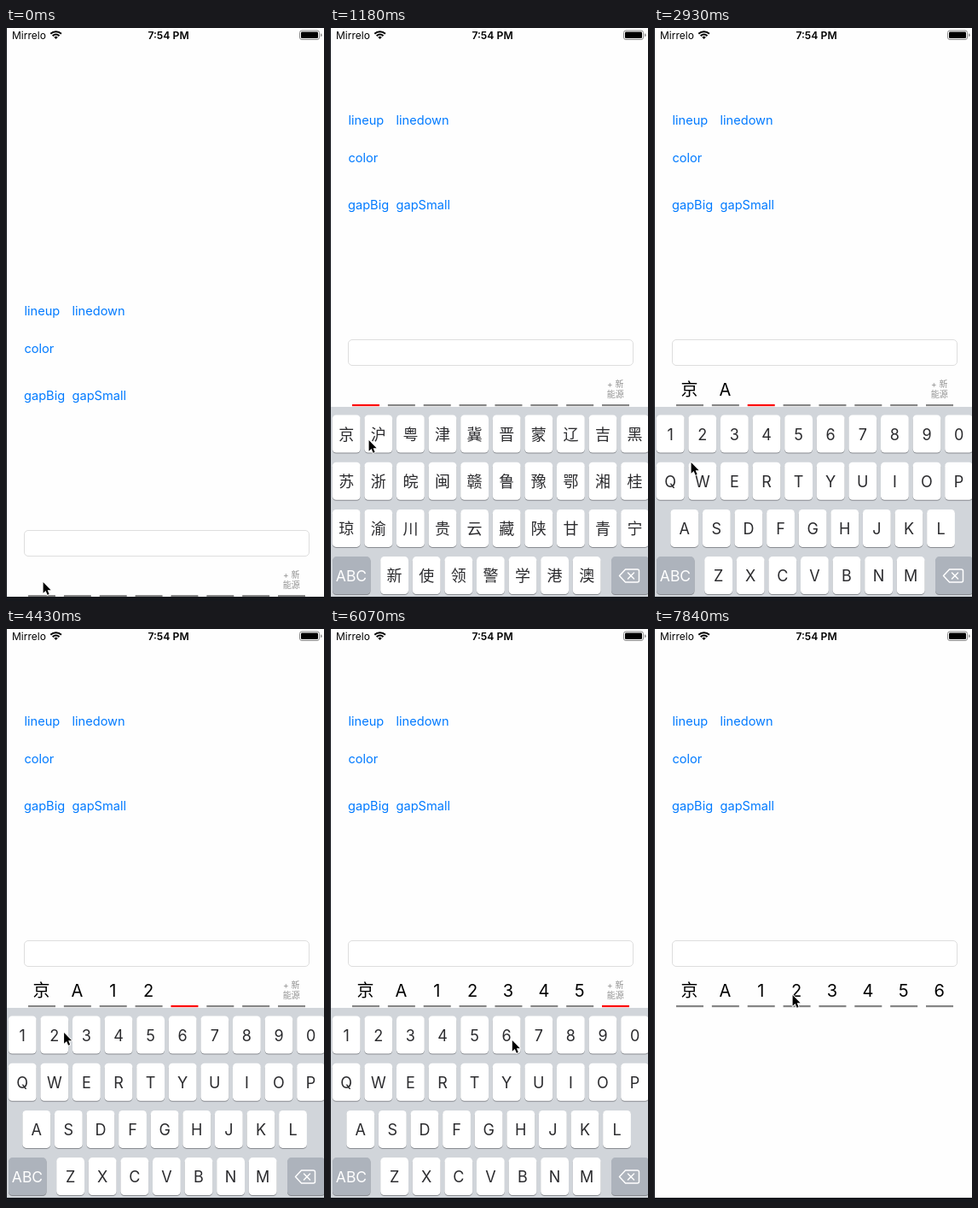
Write an HTML page that moves like this. It is 373 px wide and 670 px high and loops after 7.99 s.

```html
<!DOCTYPE html>
<html lang="zh-CN">
<head>
<meta charset="utf-8">
<title>Plate keyboard</title>
<style>
  html, body { margin: 0; width: 100%; height: 100%; overflow: hidden; background: #fefefe; }
  svg { display: block; width: 373px; height: 670px; }
  text { font-family: Inter, "Noto Sans CJK SC", "Noto Sans CJK", sans-serif; }
  .link { font-size: 14.6px; fill: #007aff; }
  .key { font-size: 18px; fill: #2b2b2e; text-anchor: middle; }
  .char { font-size: 20px; text-anchor: middle; }
  .hint { font-size: 10px; fill: #939393; text-anchor: middle; }
  .abc { font-size: 17.5px; fill: #fff; text-anchor: middle; }
</style>
</head>
<body>
<svg viewBox="0 0 373 670">
  <rect width="373" height="670" fill="#fefefe"/>
  <g id="page">
    <text class="link" x="21.5" y="113">lineup</text>
    <text class="link" x="77.5" y="113">linedown</text>
    <text class="link" x="21.5" y="157">color</text>
    <text class="link" x="21" y="212">gapBig</text>
    <text class="link" x="77.5" y="212">gapSmall</text>
    <rect x="21.5" y="364.5" width="334" height="30" rx="4.5" fill="#fff" stroke="#dedede"/>
    <g id="cells"></g>
    <g id="hint">
      <text class="hint" x="334.7" y="420.2">+ 新</text>
      <text class="hint" x="334.7" y="431.8">能源</text>
    </g>
  </g>
  <g id="board">
    <rect y="443" width="373" height="223" fill="#d1d5da"/>
    <g id="hanzi"></g>
    <g id="latin"></g>
    <g id="side"></g>
    <text class="abc" x="25" y="646.5">ABC</text>
    <g fill="none" stroke="#fff" stroke-width="1.5" stroke-linejoin="round" stroke-linecap="round">
      <path d="M339.5 640.5L346.5 633H360.5Q362.5 633 362.5 635V646Q362.5 648 360.5 648H346.5Z"/>
      <path d="M349.5 637L356.5 644M356.5 637L349.5 644"/>
    </g>
  </g>
  <rect y="665" width="373" height="5" fill="#16181d"/>
  <rect width="1" height="670" fill="#16181d"/>
  <text x="7" y="12.7" font-size="12">Mirrelo</text>
  <text x="190.5" y="12.7" font-size="12.2" font-weight="600" text-anchor="middle">7:54 PM</text>
  <g fill="none" stroke="#000" stroke-width="2">
    <path d="M52.3 6.8A8.9 8.9 0 0 1 64.9 6.8M54.7 9.2A5.5 5.5 0 0 1 62.5 9.2"/>
    <path d="M58.6 13L56.4 10.8A3.1 3.1 0 0 1 60.8 10.8Z" fill="#000" stroke="none"/>
  </g>
  <rect x="344.5" y="3" width="23" height="10.5" rx="2.5" fill="none" stroke="#8a8a8a"/>
  <rect x="346" y="4.5" width="20" height="7.5" rx="1.2"/>
  <path d="M369 6.3Q370.6 6.8 370.6 8.2T369 10.2Z" fill="#8a8a8a"/>
  <path id="cursor" d="M.6 1V13.8L3.6 11.1L5.6 15.8L7.6 14.9L5.7 10.3H9.6Z" stroke="#fff" stroke-width="1.8" paint-order="stroke" stroke-linejoin="round"/>
</svg>
<script>
const LOOP = 7990, TICK = 148, LAST = 53, SHIFT = 223;
const LEFT = 2.8, PITCH = 37.6, ROW = 55.2, KEY_W = 32.8;
const PLATE = [..."京A123456"];
const typedAt = [12, 18, 25, 30, 33, 36, 38, 42]; // tick at which each cell fills
const $ = id => document.getElementById(id);

function add(parent, tag, attrs, text = "") {
  const el = document.createElementNS("http://www.w3.org/2000/svg", tag);
  for (const k in attrs) el.setAttribute(k, attrs[k]);
  el.textContent = text;
  return parent.appendChild(el);
}

function keyCap(parent, x, row, width, fill) {
  const box = { x, y: 452.5 + row * ROW, width, height: 44, rx: 4.5 };
  add(parent, "rect", { ...box, y: box.y + 1, fill: "#898c91" });
  return add(parent, "rect", { ...box, fill });
}

const keys = {};
function layout(parent, rows, indent) {
  rows.forEach((row, r) => [...row].forEach((ch, i) => {
    const x = LEFT + (indent[r] + i) * PITCH, mid = x + KEY_W / 2;
    const cap = keyCap(parent, x, r, KEY_W, "#fff");
    add(parent, "text", { class: "key", x: mid, y: 481.5 + r * ROW }, ch);
    keys[ch] = { cap, x: mid, y: 475 + r * ROW };
  }));
}

layout($("hanzi"), ["京沪粤津冀晋蒙辽吉黑", "苏浙皖闽赣鲁豫鄂湘桂", "琼渝川贵云藏陕甘青宁", "新使领警学港澳"], [0, 0, 0, 1.5]);
layout($("latin"), ["1234567890", "QWERTYUIOP", "ASDFGHJKL", "ZXCVBNM"], [0, 0, 0.44, 1.5]);
for (const x of [3, 330]) keyCap($("side"), x, 3, 44.5, "#adb3bc");

const cells = PLATE.map((ch, i) => {
  const x = 26 + i * 41.86;
  return {
    char: add($("cells"), "text", { class: "char", x: x + 15.6, y: 430 }, ch),
    line: add($("cells"), "rect", { x, y: 440, width: 32, height: 2.2 })
  };
});

// The pointer reaches each key one tick before it types; the rest are free stops
const stops = PLATE.map((ch, i) => [typedAt[i] - 1, keys[ch].x + 6, keys[ch].y + 5]).concat([
  [0, 43, 647], [8, 45, 481], [20, 43, 507], [30, 67.5, 471],
  [43, 239, 481], [47, 245, 482], [49, 313, 450], [LAST, 162, 427]
]).sort((a, b) => a[0] - b[0]);

function pointer(n) {
  const i = Math.max(1, stops.findIndex(s => s[0] >= n));
  const [a, ax, ay] = stops[i - 1], [b, bx, by] = stops[i];
  const k = 1 - (1 - (n - a) / (b - a)) ** 2;
  return [ax + (bx - ax) * k, ay + (by - ay) * k];
}

// Critically damped spring, k in ticks
const spring = k => k <= 0 ? 0 : 1 - (1 + 2.76 * k) * Math.exp(-2.76 * k);
const move = (id, x, y) => $(id).setAttribute("transform", `translate(${x} ${y})`);
const show = (el, on) => el.setAttribute("visibility", on ? "visible" : "hidden");

function draw(n) {
  const count = typedAt.filter(t => n >= t).length;
  const up = spring(n - 1), down = spring(n - typedAt[7]);
  move("page", 0, SHIFT * (1 - up));
  move("board", 0, SHIFT * (1 - up + down));
  move("cursor", ...pointer(n));
  cells.forEach((c, i) => {
    show(c.char, i < count);
    c.line.setAttribute("fill", n > 0 && i === count ? "#fb0606" : "#858585");
  });
  show($("hint"), count < 8);
  show($("hanzi"), count === 0);
  show($("latin"), count > 0);
  keys.A.cap.setAttribute("fill", n === typedAt[1] - 1 ? "#e2e4e8" : "#fff");
}

function frame() {
  const t = performance.now() % LOOP;
  draw(Math.min(LAST, Math.floor((t + 32) / TICK)));
  requestAnimationFrame(frame);
}
frame();
</script>
</body>
</html>
```
